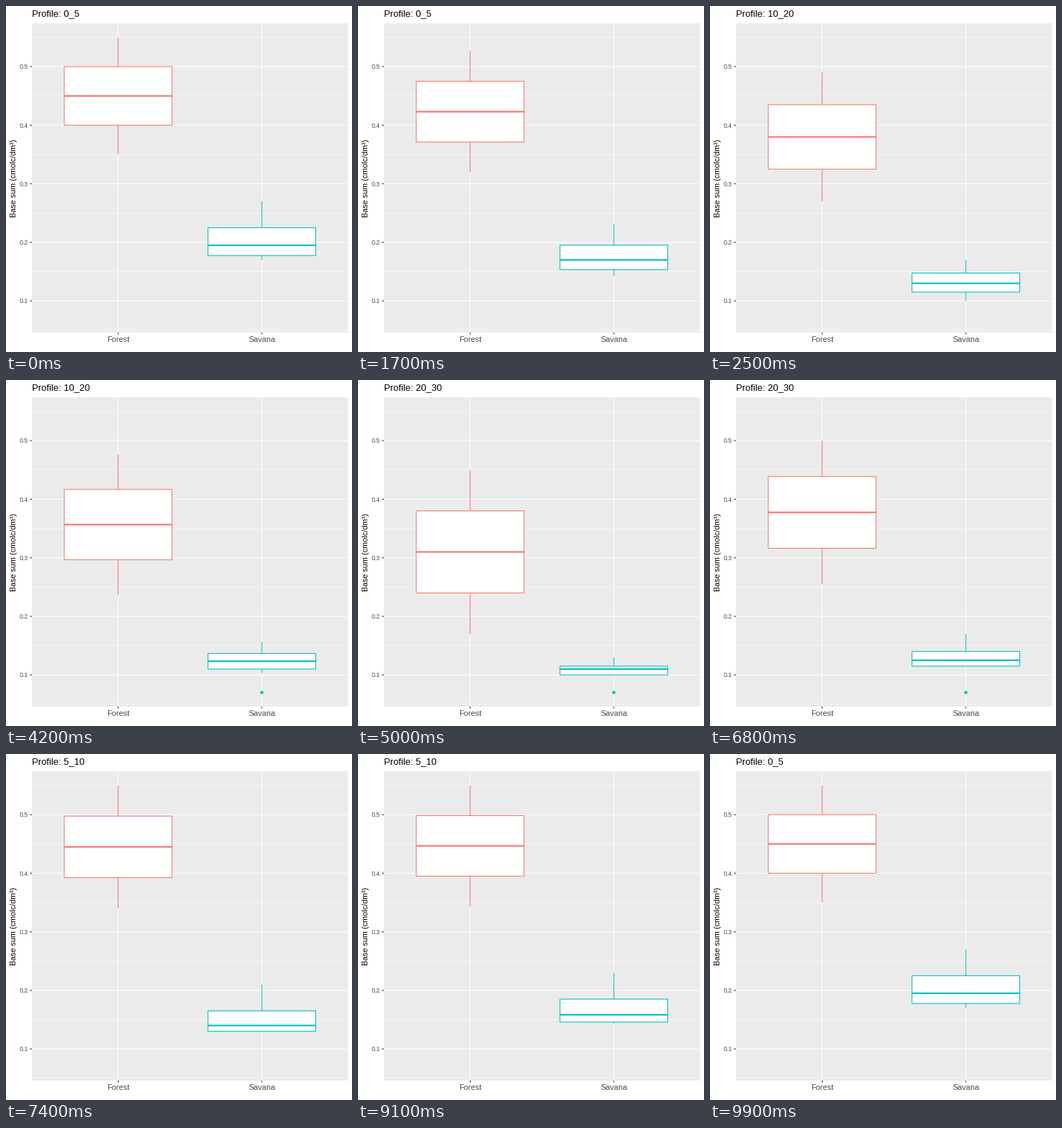
Recreate the animation shown at these times as a matplotlib script. Size 480 px wide and 480 px high, loop 10 s.

```python
import matplotlib.pyplot as plt
from matplotlib.animation import FuncAnimation
from matplotlib.patches import Circle, Rectangle
import numpy as np

SIZE, FRAMES, INTERVAL = 480, 100, 100
LEFT, RIGHT, TOP, BOTTOM = 36, 474.5, 24, 453
Y_MIN, Y_MAX = 0.046, 0.574
LINE = 1.07
GROUPS = {"Forest": "#F8766D", "Savana": "#00BFC4"}

# Measurements per profile, one list for each group
SAMPLES = {
    "0_5": ([0.35, 0.55], [0.17, 0.18, 0.21, 0.27]),
    "10_20": ([0.27, 0.49], [0.10, 0.12, 0.14, 0.17]),
    "20_30": ([0.17, 0.45], [0.07, 0.11, 0.11, 0.13]),
    "5_10": ([0.34, 0.55], [0.13, 0.13, 0.15, 0.21]),
}
NAMES = list(SAMPLES)
# First and last frame of the move away from each profile
MOVES = [(12, 25), (38, 50), (62, 74), (87, 99)]


def box_stats(values):
    """Whisker ends around the quartiles, and any outliers."""
    values = np.array(values)
    q1, med, q3 = np.quantile(values, [0.25, 0.5, 0.75])
    reach = 1.5 * (q3 - q1)
    inside = (values >= q1 - reach) & (values <= q3 + reach)
    kept = values[inside]
    return np.array([kept.min(), q1, med, q3, kept.max()]), values[~inside]


STATS = [[box_stats(v) for v in SAMPLES[name]] for name in NAMES]


def x_pos(value):
    return LEFT + (value - 0.4) / 2.2 * (RIGHT - LEFT)


def y_pos(value):
    return BOTTOM - (value - Y_MIN) / (Y_MAX - Y_MIN) * (BOTTOM - TOP)


plt.rcParams["font.family"] = "Liberation Sans"
fig = plt.figure(figsize=(SIZE / 72, SIZE / 72), dpi=72, facecolor="white")
ax = fig.add_axes([0, 0, 1, 1])
ax.set_xlim(0, SIZE)
ax.set_ylim(SIZE, 0)
ax.axis("off")


def line(xs, ys, color, width=LINE, z=1):
    return ax.plot(xs, ys, color=color, lw=width, zorder=z, snap=False,
                   solid_capstyle="butt")[0]


def label(x, y, text, size, color="black", **kw):
    return ax.text(x, y, text, fontsize=size, color=color,
                   va="baseline", **kw)


class Box:
    def __init__(self, index, color):
        self.mid = x_pos(index + 1)
        half = 0.375 * (RIGHT - LEFT) / 2.2
        ends = [self.mid - half, self.mid + half]
        self.low = line([], [], color, z=3)
        self.high = line([], [], color, z=3)
        self.rect = ax.add_patch(Rectangle(
            (ends[0], 0), 2 * half, 0, fc="white", ec=color, lw=LINE,
            joinstyle="miter", snap=False, zorder=4))
        self.median = line(ends, [0, 0], color, 2 * LINE, z=5)
        self.dot = ax.add_patch(Circle((self.mid, 0), 2.3, lw=0, fc=color,
                                       zorder=6))

    def set(self, stats, outliers):
        low, q1, med, q3, high = y_pos(stats)
        self.low.set_data([self.mid] * 2, [low, q1])
        self.high.set_data([self.mid] * 2, [q3, high])
        self.rect.set_y(q3)
        self.rect.set_height(q1 - q3)
        self.median.set_ydata([med, med])
        self.dot.set_visible(len(outliers) > 0)
        if len(outliers):
            self.dot.center = self.mid, y_pos(outliers[0])


# Panel, grid and axes
ax.add_patch(Rectangle((LEFT, TOP), RIGHT - LEFT, BOTTOM - TOP,
                       fc="#EBEBEB", lw=0, snap=False, zorder=0))
for k in range(6):
    line([LEFT, RIGHT], [y_pos(k / 10 + 0.05)] * 2, "white", LINE / 2)
for k in range(1, 6):
    y = y_pos(k / 10)
    line([LEFT, RIGHT], [y] * 2, "white", z=2)
    line([LEFT - 2.74, LEFT], [y] * 2, "#333333")
    label(31.1, y + 3.2, f"{k / 10:.1f}", 8.8, "#4D4D4D", ha="right")
boxes = []
for i, (name, color) in enumerate(GROUPS.items()):
    x = x_pos(i + 1)
    line([x, x], [TOP, BOTTOM], "white", z=2)
    line([x, x], [BOTTOM, BOTTOM + 2.74], "#333333")
    label(x, 466, name, 11, "#4D4D4D", ha="center")
    boxes.append(Box(i, color))

label(14, 238.5, "Base sum (cmolc/dm³)", 10.7, ha="center",
      rotation=90, rotation_mode="anchor")
title = label(LEFT, 14, "", 13, ha="left")


def progress(frame):
    """Profile index and linear progress towards the next profile."""
    for i, (start, end) in enumerate(MOVES):
        if frame < end:
            return i, max(0, (frame - start) / (end - start))
    return 0, 0


def update(frame):
    i, t = progress(frame)
    j = (i + 1) % len(NAMES)
    for box, (a, a_out), (b, b_out) in zip(boxes, STATS[i], STATS[j]):
        # Outliers of either profile stay in place throughout a move
        outliers = np.append(a_out, b_out) if t > 0 else a_out
        box.set(a + (b - a) * t, outliers)
    title.set_text("Profile: " + NAMES[j if t > 0.5 else i])
    return []


anim = FuncAnimation(fig, update, frames=FRAMES, interval=INTERVAL,
                     init_func=lambda: update(0), repeat=True, repeat_delay=0)
plt.show()
```
